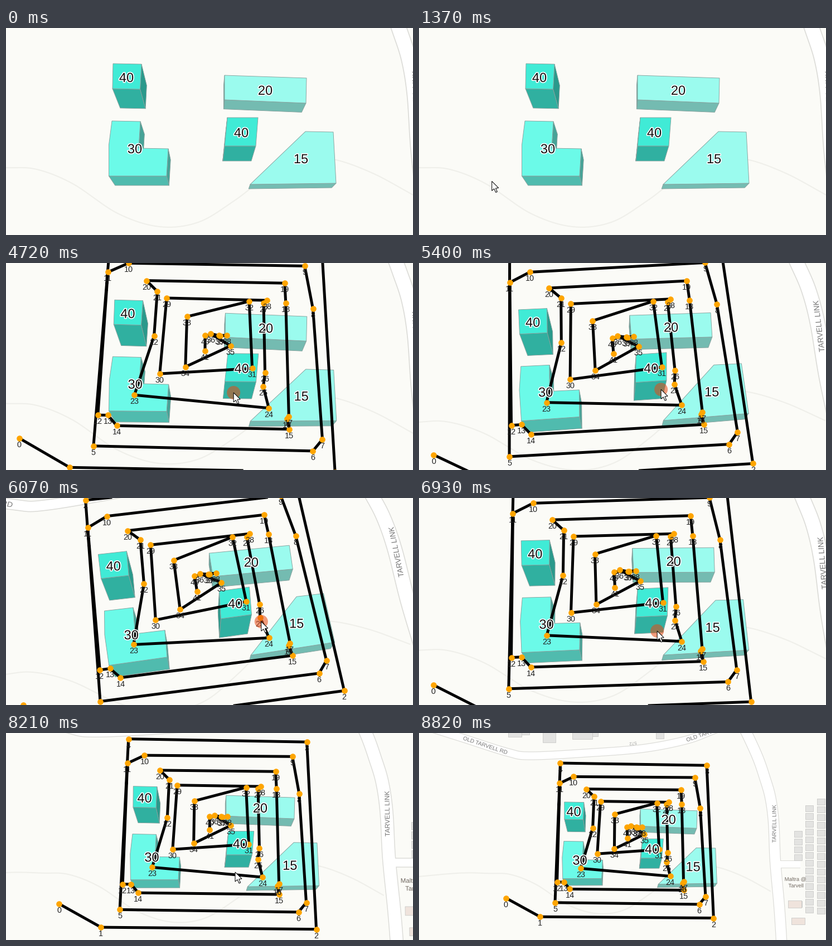
These frames come from a looping animation (730 by 372 pixels, 9150 ms). A matplotlib script:

```python
import numpy as np
import matplotlib.pyplot as plt
from matplotlib.animation import FuncAnimation
from matplotlib.patches import Circle, PathPatch, Polygon
from matplotlib.path import Path
from matplotlib.patheffects import withStroke
from matplotlib.textpath import TextPath

W, H = 730, 372
LOOP, STEP = 9150, 50
PX = 0.72                        # points per pixel at 100 dpi
FOCAL, CX, CY = 1050, 355, 186
UNIT = 2.36                      # world length of one height unit
FLIGHT = 50 * UNIT
FONT = "Liberation Sans"

# camera: target x, target y, heading, tilt, distance
HOME = np.array([0, 0, 0, np.arctan(0.32), 1050.0])


def project(cam, pts):
    tx, ty, head, tilt, dist = cam
    x, y, z = pts[:, 0] - tx, pts[:, 1] - ty, pts[:, 2]
    c, s = np.cos(head), np.sin(head)
    u, v = c * x + s * y, c * y - s * x
    depth = dist + v * np.sin(tilt) - z * np.cos(tilt)
    up = v * np.cos(tilt) + z * np.sin(tilt)
    return np.column_stack([CX + FOCAL * u / depth, CY - FOCAL * up / depth])


def unproject(cam, screen, z=0.0):
    tx, ty, head, tilt, dist = cam
    screen = np.asarray(screen, float)
    p, q = (screen[:, 0] - CX) / FOCAL, (CY - screen[:, 1]) / FOCAL
    ct, st = np.cos(tilt), np.sin(tilt)
    v = (q * (dist - z * ct) - z * st) / (ct - q * st)
    u = p * (dist + v * st - z * ct)
    c, s = np.cos(head), np.sin(head)
    return np.column_stack([tx + c * u - s * v, ty + s * u + c * v,
                            np.full(len(p), z)])


def solve_camera(world, seen):
    """Least-squares camera that puts the landmarks where they are seen."""
    seen = np.array(seen, float).ravel()
    cam = HOME.copy()
    steps = (0.1, 0.1, 1e-4, 1e-4, 0.1)
    for _ in range(15):
        base = project(cam, world).ravel()
        jac = [(project(cam + d, world).ravel() - base) / h
               for d, h in zip(np.diag(steps), steps)]
        cam = cam + np.linalg.lstsq(np.array(jac).T, seen - base, rcond=None)[0]
    return cam


def smooth(pts, n=10):
    """Catmull-Rom curve through the points."""
    p = np.array(pts, float)
    p = np.vstack([2 * p[0] - p[1], p, 2 * p[-1] - p[-2]])
    t = np.linspace(0, 1, n, endpoint=False)[:, None]
    parts = []
    for a, b, c, d in zip(p, p[1:], p[2:], p[3:]):
        parts.append(0.5 * (2 * b + (c - a) * t
                            + (2 * a - 5 * b + 4 * c - d) * t**2
                            + (3 * b - a - 3 * c + d) * t**3))
    return np.vstack(parts + [p[-2:-1]])


def ribbon(pts, width):
    d = np.gradient(pts, axis=0)
    n = np.column_stack([-d[:, 1], d[:, 0]])
    n *= width / 2 / np.hypot(n[:, 0], n[:, 1])[:, None]
    return np.vstack([pts + n, (pts - n)[::-1]])


def rect(x, y, w, h):
    return np.array([(x, y), (x + w, y), (x + w, y + h), (x, y + h)], float)


def close(pts):
    return np.vstack([pts, pts[:1]])


# ---- scene data, in screen positions of the home view ----
ROUTE = np.array([
    (25, 319), (116, 371), (589.5, 376), (566, -31), (182, -38), (158, 332),
    (550, 338), (567, 317), (550, 79), (535, 0), (216, -3), (179, 14),
    (165, 276), (183, 276), (199, 295), (508, 299), (504, 280), (507, 276),
    (501, 69), (499, 32), (249, 29), (269, 49), (264, 131), (230, 239),
    (471, 261), (461, 222), (464, 197), (461, 69), (467, 64), (286, 61),
    (275, 200), (441, 189), (435, 66), (323, 95), (321, 187), (402, 148),
    (366, 126), (383, 130), (395, 129), (381, 129), (356, 129), (356, 158)])
route = unproject(HOME, ROUTE, FLIGHT)

# height, roof colour, label position, roof outline
BUILDINGS = [
    (40, (64, 235, 214), (216, 89),
     [(192, 64), (243, 65), (240.5, 110), (191, 109)]),
    (20, (155, 251, 238), (465, 112),
     [(392, 85), (539, 90), (538, 135), (392, 129)]),
    (30, (107, 250, 232), (231, 217),
     [(190, 167), (241, 168), (238, 216), (291, 217), (288, 266),
      (184.5, 266), (184.5, 210)]),
    (40, (64, 235, 214), (422, 188),
     [(397, 161), (452, 161), (448, 212), (392, 212)]),
    (15, (155, 251, 238), (529, 235),
     [(537, 186), (587, 187), (592, 279), (438, 281)]),
]

# ---- camera poses from landmarks: eight route stops and two roof corners ----
marks = np.vstack([route[[5, 6, 8, 11, 14, 19, 23, 31]],
                   unproject(HOME, [(192, 64)], 40 * UNIT),
                   unproject(HOME, [(592, 279)], 15 * UNIT)])
NUDGED = solve_camera(marks, [
    (157, 330), (551, 339), (551, 84), (183, 17), (198, 293),
    (500, 38), (230, 236), (442, 186), (195, 65), (592, 282)])
TURNED = solve_camera(marks, [
    (168, 369), (561, 317), (518, 70), (146, 54), (204, 325),
    (461, 33), (230, 261), (434, 180), (168, 99), (590, 257)])
RETURNING = solve_camera(marks, [
    (160, 344), (554, 331), (540, 76), (168, 28), (200, 305),
    (486, 33), (230, 246), (439, 185), (185, 75), (591, 273)])
WIDE = solve_camera(marks, [
    (242, 305), (504, 308), (505, 133), (252, 90), (269, 281),
    (470, 101), (292, 243), (430, 210), (264, 126), (532, 270)])

POSE_T = [4550, 4720, 6070, 6930, 7600, 7770, 8820]
POSES = np.array([HOME, NUDGED, TURNED, RETURNING, HOME, HOME, WIDE])

CURSOR = np.array([
    (0, 545, 400), (130, 540, 374), (180, 520, 366), (820, 41, 325),
    (1040, 41, 325), (1130, 22, 320), (1910, 368, 178), (2100, 357, 175),
    (3160, 357, 175), (3900, 655, 362), (4050, 655, 362), (4500, 411, 250),
    (4550, 411, 250), (4720, 408, 233), (6070, 458, 222), (6930, 427, 239),
    (7600, 411, 250)])
ARROW = np.array([(0, 0), (0, 17), (4, 13.5), (7, 20), (9.6, 19),
                  (6.8, 12.6), (12, 12)])

# ---- figure ----
fig = plt.figure(figsize=(W / 100, H / 100), dpi=100)
ax = fig.add_axes([0, 0, 1, 1])
ax.set_xlim(0, W)
ax.set_ylim(H, 0)
ax.axis("off")
fig.patch.set_facecolor("#fbfbf7")

shapes = []                      # (patch, world points, codes)


def add_shape(world, codes=None, **style):
    patch = PathPatch(Path(world[:, :2], codes), **style)
    ax.add_patch(patch)
    shapes.append((patch, world, codes))
    return patch


def ground(pts, **style):
    add_shape(unproject(WIDE, close(pts)), **style)


def map_text(s, x, y, size, angle=0, color="#777777"):
    path = TextPath((0, 0), s, size=size, prop={"family": FONT})
    box = path.get_extents()
    v = path.vertices - [(box.x0 + box.x1) / 2, (box.y0 + box.y1) / 2]
    c, s = np.cos(np.radians(angle)), np.sin(np.radians(angle))
    pts = np.column_stack([x + c * v[:, 0] - s * v[:, 1],
                           y - s * v[:, 0] - c * v[:, 1]])
    add_shape(unproject(WIDE, pts), path.codes, fc=color, lw=0, zorder=3)


def draw_map():
    trail = smooth([(-220, 262), (-80, 250), (0, 251), (55, 254), (120, 280),
                    (200, 333), (275, 357), (345, 349), (410, 310), (470, 266),
                    (540, 235), (592, 237), (660, 262), (730, 300)])
    add_shape(unproject(HOME, trail), fc="none", ec="#efefea",
              lw=2 * PX, zorder=1)

    roads = [
        (smooth([(-60, -38), (0, -16), (78, 9), (160, 35), (200, 41),
                 (300, 36), (400, 28), (478, 13), (525, -4), (590, -30)]), 13),
        (smooth([(560, -60), (575, -25), (590, 5), (608, 45), (620, 80),
                 (630, 115), (636, 160), (639, 230), (646, 310), (650, 372),
                 (652, 420)]), 18),
        (smooth([(640, 236), (660, 236), (680, 236), (684, 236)]), 12),
    ]
    for line, width in roads:
        ground(ribbon(line, width + 2.4), fc="#dcdcd8", lw=0, zorder=1.5)
    for line, width in roads:
        ground(ribbon(line, width), fc="white", lw=0, zorder=2)

    house = dict(fc="#e3e3e1", ec="#c8c8c6", lw=0.8 * PX, zorder=2.5)
    for x, top in ((673, 176), (693, 130), (714, 118)):
        for y in range(top, 316, 14):
            if not (x < 690 and 222 < y < 290):
                ground(rect(x, y, 14, 11), **house)
    for block in ((160, -6, 24, 13), (184, -6, 14, 9), (222, -8, 23, 25),
                  (275, -8, 36, 19), (311, -8, 10, 14), (425, -8, 14, 18)):
        ground(rect(*block), **house)
    pink = dict(house, fc="#efe3dc")
    ground(rect(662, 301, 24, 13), **pink)
    ground(rect(668, 332, 24, 12), **pink)

    map_text("OLD TARVELL RD", 119, 22, 10, -18.5)
    map_text("OLD TARVELL RD", 519, -1, 10, 19)
    map_text("TARVELL LINK", 637, 163, 10, 90)
    map_text("572", 384, 19, 8, 188, "#a5a5a5")
    map_text("Maltra @", 675, 263, 9.5, color="#6f675f")
    map_text("Tarvell", 676, 274, 9.5, color="#6f675f")


walls = []
tags = []                        # (text, world point, drop below the point)


def add_building(height, color, spot, outline):
    z = height * UNIT
    roof = unproject(HOME, outline, z)
    base = roof * [1, 1, 0]
    rgb = np.array(color) / 255
    edge = dict(ec="#86a19d", lw=0.9 * PX, joinstyle="round")
    n = len(roof)
    for i in range(n):
        j = (i + 1) % n
        dx, dy = (roof[j] - roof[i])[:2]
        shade = 0.75 - 0.1 * abs(dy) / np.hypot(dx, dy)
        quad = np.array([roof[i], roof[j], base[j], base[i], roof[i]])
        walls.append(add_shape(quad, fc=rgb * shade, zorder=5, **edge))
    add_shape(close(roof), fc=rgb, zorder=6, **edge)
    text = ax.text(0, 0, str(height), size=17, family=FONT, ha="center",
                   va="baseline", color="#111111", zorder=13,
                   path_effects=[withStroke(linewidth=3.4 * PX,
                                            foreground="white")])
    tags.append((text, unproject(HOME, [spot], z), 8))


draw_map()
for building in BUILDINGS:
    add_building(*building)

track, = ax.plot([], [], color="black", lw=5 * PX, zorder=10,
                 solid_joinstyle="round")
stops, = ax.plot([], [], "o", color="#ffa500", ms=10.6 * PX, mew=0, zorder=11)
numbers = []
for i, point in enumerate(route):
    text = ax.text(0, 0, str(i), size=10.4, family=FONT, ha="center",
                   va="baseline", color="#222222", zorder=12)
    numbers.append(text)
    tags.append((text, point[None], 16))

press = Circle((0, 0), 12, fc=(0.9, 0.29, 0.08, 0.55), lw=0, zorder=20)
pointer = Polygon(ARROW, fc="white", ec="black", lw=1 * PX, zorder=21)
ax.add_patch(press)
ax.add_patch(pointer)


def facing(quad):
    x, y = quad[:-1].T
    return np.sum(x * np.roll(y, -1) - np.roll(x, -1) * y) < 0


def draw(k):
    t = k * STEP + STEP / 2
    cam = np.array([np.interp(t, POSE_T, col) for col in POSES.T])

    for patch, world, codes in shapes:
        patch.set_path(Path(project(cam, world), codes))
    for wall in walls:
        wall.set_visible(facing(wall.get_path().vertices))

    flown = t >= 2560
    pts = project(cam, route)
    for line in (track, stops):
        line.set_data(pts[:, 0], pts[:, 1])
        line.set_visible(flown)
    for text in numbers:
        text.set_visible(flown)
    for text, world, drop in tags:
        x, y = project(cam, world)[0]
        text.set_position((x, y + drop))

    tip = np.array([np.interp(t, CURSOR[:, 0], CURSOR[:, i]) for i in (1, 2)])
    pointer.set_xy(ARROW + tip)
    pointer.set_visible(130 <= t < 8750)
    press.center = tuple(tip)
    press.set_visible(2240 <= t < 2300 or 4530 <= t < 7650)
    return []


anim = FuncAnimation(fig, draw, frames=LOOP // STEP, interval=STEP,
                     repeat=True, blit=False)
plt.show()
```
